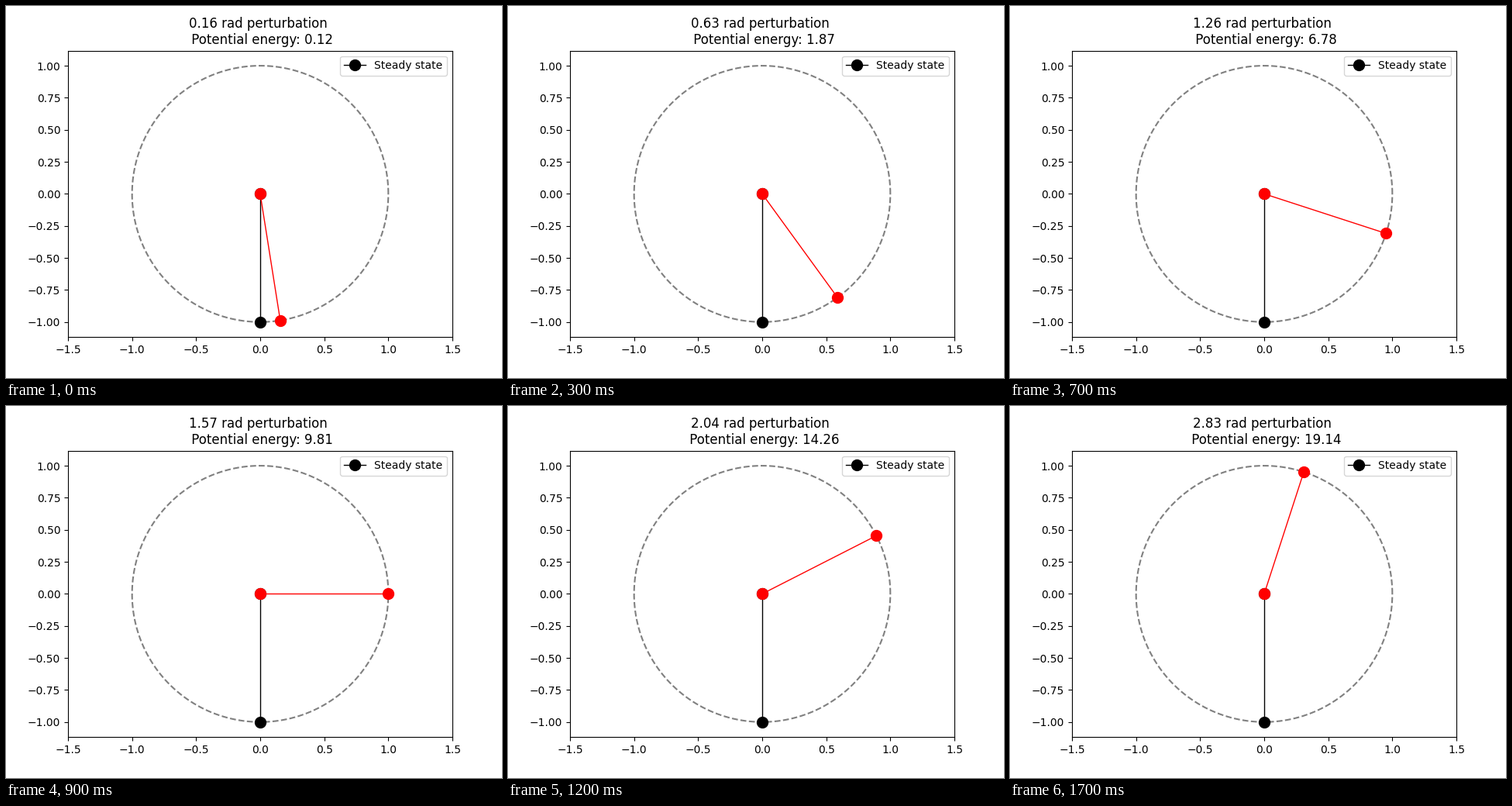
These frames come from a looping animation (640x480 px, 1800 ms). A matplotlib script:

```python
import numpy as np
import matplotlib.pyplot as plt
from matplotlib.animation import FuncAnimation

FRAMES = 18
GRAVITY = 9.81
STEP = np.pi / 20

plt.rcParams["font.family"] = "DejaVu Sans"
fig, ax = plt.subplots(figsize=(6.4, 4.8), dpi=100)

# Same pixels per unit on both axes
half_width = 1.5
half_height = half_width * (0.77 * 4.8) / (0.775 * 6.4)
ax.set_xlim(-half_width, half_width)
ax.set_ylim(-half_height, half_height)

turn = np.linspace(0, 2 * np.pi, 200)
ax.plot(np.cos(turn), np.sin(turn), "--", color="gray", lw=1.5)


def rod(color, **kwargs):
    line, = ax.plot([0, 0], [0, -1], "o-", color=color, lw=1, ms=10, **kwargs)
    return line


rod("black", label="Steady state")
pendulum = rod("red")
title = ax.set_title("")
ax.legend(loc="upper right")


def update(i):
    angle = (i + 1) * STEP
    energy = GRAVITY * (1 - np.cos(angle))
    pendulum.set_data([0, np.sin(angle)], [0, -np.cos(angle)])
    title.set_text(f"{angle:.2f} rad perturbation \n Potential energy: {energy:.2f}")
    return pendulum, title


anim = FuncAnimation(fig, update, frames=FRAMES, interval=100,
                     repeat=True, repeat_delay=0, blit=False)
plt.show()
```
